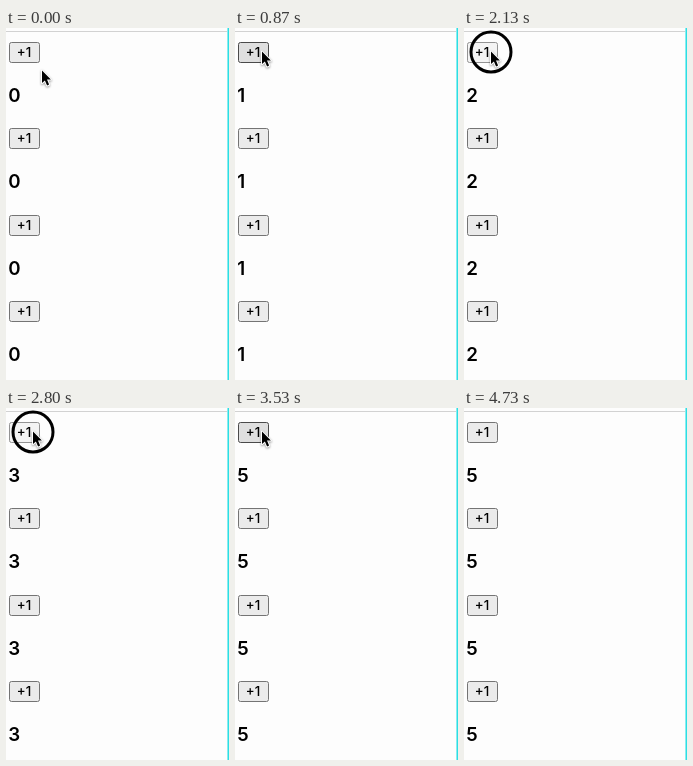
Recreate the animation shown at these times as an HTML page. Size 223 px wide and 352 px high, loop 5.59 s.

```html
<!DOCTYPE html>
<html lang="en">
<head>
<meta charset="utf-8">
<title>Counters</title>
<style>
html, body { margin: 0; width: 100%; height: 100%; overflow: hidden; background: #fdfdfd; }
svg { display: block; }
text { font-family: Inter, Roboto, sans-serif; fill: #000; }
.label { font-size: 13.33px; font-weight: 500; text-anchor: middle; }
.count { font-size: 18.72px; font-weight: 600; }
.idle { fill: #ebebeb; stroke: #747474; }
.hover { fill: #dfdfdf; stroke: #4a4a4a; }
.active { fill: #f4f4f4; stroke: #939393; }
#cursor { filter: drop-shadow(0 1px 1px rgba(0, 0, 0, .4)); }
</style>
</head>
<body>
<svg id="stage" width="223" height="352" viewBox="0 0 223 352">
  <path d="M0 3.5H222" stroke="#d2d2d2"/>
  <rect x="221" width="1" height="352" fill="#8aecef"/>
  <rect x="222" width="1" height="352" fill="#2bdfe4"/>
  <g id="rows"></g>
  <circle id="ring" cx="27" cy="24" r="20" fill="none" stroke="#000" stroke-width="3"/>
  <path id="cursor" d="M.5 1V13.6L3.4 10.9L5.6 16L7.6 15.1L5.5 10.1H9.4Z"
    stroke="#fff" stroke-width="2" stroke-linejoin="round" paint-order="stroke"/>
</svg>
<script>
const LOOP = 5590, FPS = 15;
const PRESSES = [11, 22, 32, 42, 51];   // in frames
const RING = 2;                         // frames the ring stays
const $ = id => document.getElementById(id);
const lerp = (a, b, p) => a + (b - a) * p;

$('rows').innerHTML = [0, 1, 2, 3].map(i => `
  <g transform="translate(0 ${Math.round(86.4 * i)})">
    <rect class="idle" x="3.5" y="14.5" width="30" height="20" rx="2"/>
    <text class="label" x="18" y="29">+1</text>
    <text class="count" x="2.3" y="74">0</text>
  </g>`).join('');
const button = document.querySelector('rect.idle');
const counts = document.querySelectorAll('.count');

// Pointer tip: onto the button, away to the right, then an arc past the edge
function pointer(f) {
  if (f < 58) {
    const p = Math.min(f / 3, 1);
    return [lerp(35.5, 26.5, p), lerp(41.5, 22.5, p)];
  }
  if (f < 61) {
    const p = (f - 57) / 3;
    return [lerp(26.5, 206, p), lerp(22.5, 165, p)];
  }
  if (f >= 68 && f < 71) {
    const p = f - 69;
    return [169 + 36 * p * p, 97 - 85 * p];
  }
  return null;
}

function draw(t) {
  const f = Math.floor((t + 4) * FPS / 1000);
  const tip = pointer(f);
  $('cursor').style.display = tip ? '' : 'none';
  if (tip) $('cursor').setAttribute('transform', `translate(${tip})`);

  // the first two presses are held a frame longer
  const release = (start, i) => start + (i < 2 ? 2 : 1);
  const ring = PRESSES.some(s => f >= s && f < s + RING);
  const pressed = PRESSES.some((s, i) => f >= s && f < release(s, i));
  const over = tip && tip[0] < 34 && tip[1] < 35;
  $('ring').style.display = ring ? '' : 'none';
  button.setAttribute('class', pressed ? 'active' : over ? 'hover' : 'idle');

  const n = PRESSES.filter((s, i) => f >= release(s, i)).length;
  counts.forEach(c => c.textContent = n);
}

const start = performance.now();
function tick() {
  draw((performance.now() - start) % LOOP);
  requestAnimationFrame(tick);
}
tick();
</script>
</body>
</html>
```
